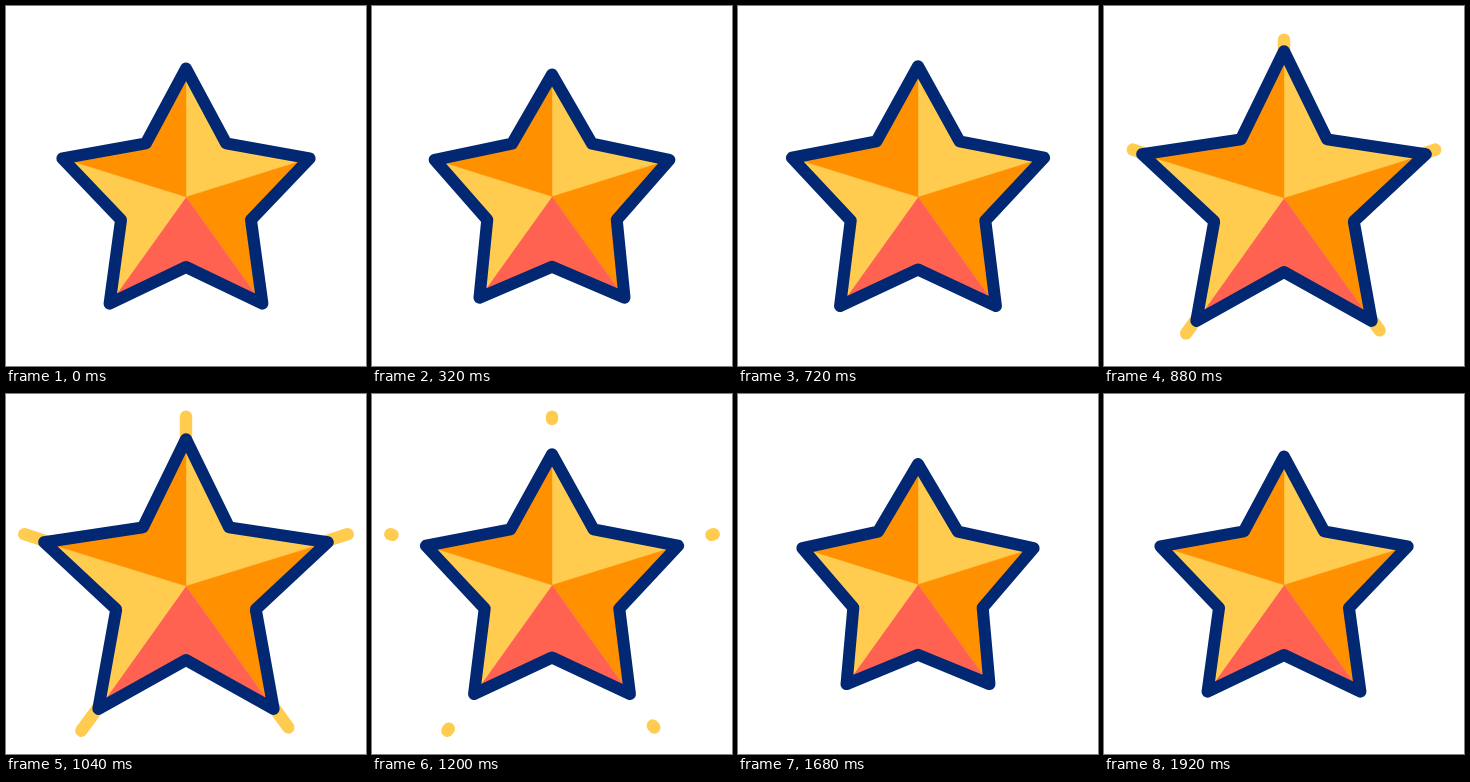
These frames come from a looping animation (360x360 px, 2 s). An HTML page:

```html
<!DOCTYPE html>
<html lang="en">
<head>
<meta charset="utf-8">
<title>Pulsing star</title>
<style>
  html, body { margin: 0; height: 100%; overflow: hidden; background: #fff; }
  svg { display: block; width: 100vw; height: 100vh; }
</style>
</head>
<body>
<svg viewBox="0 0 360 360">
  <path id="rays" fill="none" stroke="#ffcc50" stroke-width="12.4" stroke-linecap="round"/>
  <g id="facets" stroke-width="0.4"></g>
  <path id="outline" fill="none" stroke="#022873" stroke-width="12" stroke-linejoin="round"/>
</svg>
<script>
const LOOP = 2000, STEP = 40;
const CENTER_X = 180, CENTER_Y = 192.7;
const YELLOW = '#ffcc50', ORANGE = '#ff9100', RED = '#ff6250';

const REST = { outer: 130, inner: 68.3 };
const SMALL = { outer: 113.2, inner: 67.7 };
const LARGE = { outer: 152, inner: 73.8 };
const KEYS = [[200, REST], [480, SMALL], [960, LARGE], [1440, SMALL], [1920, REST]];

const RAY_LENGTHS = [170, 170, 174, 178, 170];
const RAY_START = 0.75;

const rays = document.getElementById('rays');
const outline = document.getElementById('outline');
const facets = [YELLOW, ORANGE, RED, YELLOW, ORANGE].map(color => {
  const path = document.createElementNS('http://www.w3.org/2000/svg', 'path');
  path.setAttribute('fill', color);
  path.setAttribute('stroke', color);
  return document.getElementById('facets').appendChild(path);
});

const mix = (a, b, k) => a + (b - a) * k;
const polygon = points => 'M' + points.join('L') + 'Z';

// Point on a ring; turn 0 is straight up, each whole turn is a fifth of a circle.
function spoke(radius, turn, centerY = CENTER_Y) {
  const angle = turn * Math.PI * 2 / 5;
  return [CENTER_X + radius * Math.sin(angle), centerY - radius * Math.cos(angle)];
}

function ease(t, from, to) {
  const x = Math.min(1, Math.max(0, (t - from) / (to - from)));
  return x * x * (3 - 2 * x);
}

function pose(t) {
  const next = KEYS.findIndex(([time]) => t < time);
  if (next < 1) return REST;
  const [from, a] = KEYS[next - 1], [to, b] = KEYS[next];
  const k = ease(t, from, to);
  return { outer: mix(a.outer, b.outer, k), inner: mix(a.inner, b.inner, k) };
}

function drawStar(t) {
  const { outer, inner } = pose(t);
  // The tips and the facet hub sink a little as the star grows.
  const growth = outer - REST.outer;
  const tipsY = CENTER_Y - 0.2 + 0.093 * growth;
  const hub = [CENTER_X, CENTER_Y - 1.8 + 0.062 * growth];
  const tip = i => spoke(outer, i, tipsY);
  const notch = i => spoke(inner, i + 0.5);
  outline.setAttribute('d', polygon(facets.flatMap((_, i) => [tip(i), notch(i)])));
  facets.forEach((path, i) =>
    path.setAttribute('d', polygon([hub, tip(i), notch(i), tip(i + 1)])));
}

function drawRays(t) {
  const visible = t > 720 && t < 1240;
  const head = mix(RAY_START, 1, ease(t, 720, 960));
  const tail = mix(RAY_START, 1, ease(t, 960, 1240));
  rays.setAttribute('d', visible ? RAY_LENGTHS.map((length, i) =>
    `M${spoke(length * tail, i)}L${spoke(length * head, i)}`).join('') : '');
}

function frame(now) {
  const t = Math.floor(now % LOOP / STEP) * STEP;
  drawStar(t);
  drawRays(t);
  requestAnimationFrame(frame);
}
frame(0);
</script>
</body>
</html>
```
